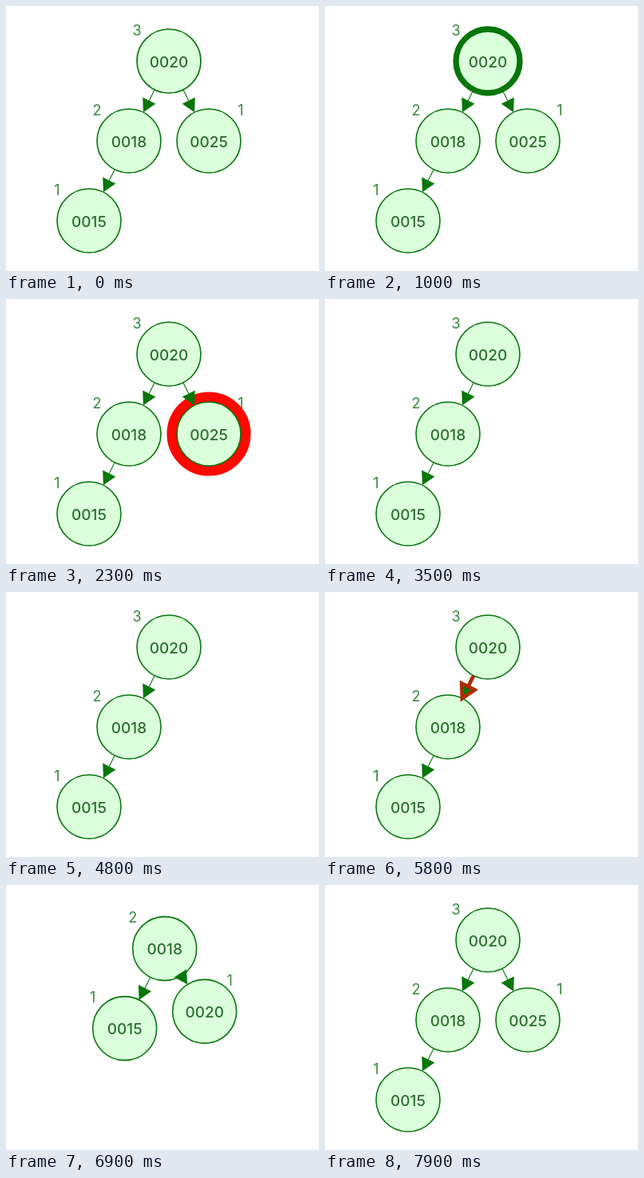
Animation of 392x332 px, one loop 8 s. Source, as an HTML page with a canvas:

```html
<!DOCTYPE html>
<html lang="en">
<head>
<meta charset="utf-8">
<title>Tree deletion and rotation</title>
<style>
html, body { margin: 0; width: 392px; height: 332px; overflow: hidden; background: #fefefe; }
canvas { display: block; }
</style>
</head>
<body>
<canvas id="stage" width="392" height="332"></canvas>
<script>
const ctx = document.getElementById('stage').getContext('2d');
const LOOP = 8000, RADIUS = 40;
const GREEN = [6, 118, 10], RED = [255, 8, 0];
const INK = '#2c6e2e', FILL = '#dbffdb', LABEL = '#35883a';

const rgb = c => `rgb(${c.map(Math.round).join(',')})`;
const lerp = (a, b, k) => a + (b - a) * k;
const mix = (a, b, k) => a.map((v, i) => lerp(v, b[i], k));
const progress = (t, start, length) => Math.min(1, Math.max(0, (t - start) / length));
const pulse = (t, start, length) => Math.sin(Math.PI * progress(t, start, length));

function circle(node, width, color, fill) {
  ctx.beginPath();
  ctx.arc(node.x, node.y, RADIUS, 0, Math.PI * 2);
  if (fill) {
    ctx.fillStyle = fill;
    ctx.fill();
  }
  ctx.lineWidth = width;
  ctx.strokeStyle = color;
  ctx.stroke();
}

function drawNode(node) {
  if (node.halo > 0.01) circle(node, 1.6 + 29 * node.halo, rgb(RED));
  circle(node, 1.6 + 28.4 * (node.ring || 0), rgb(GREEN), FILL);
}

function text(value, x, y, font, color) {
  ctx.font = font;
  ctx.fillStyle = color;
  ctx.fillText(value, x, y);
}

function drawText(node) {
  text(node.key, node.x, node.y + 7.5, '500 19px Inter, sans-serif', INK);
  text(node.height, node.x + node.side, node.y - 32.5, '18px Inter, sans-serif', LABEL);
}

function drawEdge(from, to, glow = 0) {
  const dx = to.x - from.x, dy = to.y - from.y, dist = Math.hypot(dx, dy);
  ctx.save();
  ctx.translate(from.x, from.y);
  ctx.rotate(Math.atan2(dy, dx));
  const tip = dist - RADIUS, base = tip - 16.5;
  ctx.strokeStyle = rgb(mix(GREEN, RED, glow));
  ctx.fillStyle = rgb(GREEN);
  ctx.lineWidth = 1.1 + 5.6 * glow;
  ctx.beginPath();
  ctx.moveTo(RADIUS, 0);
  ctx.lineTo(base, 0);
  ctx.stroke();
  ctx.beginPath();
  ctx.moveTo(tip, 0);
  ctx.lineTo(base, -9);
  ctx.lineTo(base, 9);
  ctx.closePath();
  ctx.fill();
  if (glow > 0.01) ctx.stroke();
  ctx.restore();
}

function draw(t) {
  if (t >= 7800) t = 0;
  const turn = progress(t, 6030, 975);
  const rotating = turn > 0;
  const root = {
    key: '0020', height: rotating ? '1' : '3',
    x: lerp(204, 254, turn), y: lerp(69, 169, turn), side: lerp(-40, 40, turn),
    ring: pulse(t, 0, 1070)
  };
  const left = {
    key: '0018', height: '2',
    x: lerp(154, 204, turn), y: lerp(169, 69, turn), side: -40
  };
  const leaf = {
    key: '0015', height: '1',
    x: lerp(104, 154, turn), y: lerp(269, 169, turn), side: -40
  };
  const right = {
    key: '0025', height: '1', x: 254, y: 169, side: 40,
    halo: pulse(t, 2000, 1000)
  };
  const hasRight = t < 3000;
  const nodes = hasRight ? [root, left, right, leaf] : [root, left, leaf];

  ctx.fillStyle = '#fefefe';
  ctx.fillRect(0, 0, 392, 332);
  ctx.textAlign = 'center';
  nodes.forEach(drawNode);
  if (rotating) drawEdge(left, root);
  else drawEdge(root, left, pulse(t, 5030, 1000));
  drawEdge(left, leaf);
  if (hasRight) drawEdge(root, right, pulse(t, 1050, 950));
  nodes.forEach(drawText);
}

const start = performance.now();
function tick() {
  draw((performance.now() - start) % LOOP);
  requestAnimationFrame(tick);
}
tick();
</script>
</body>
</html>
```
